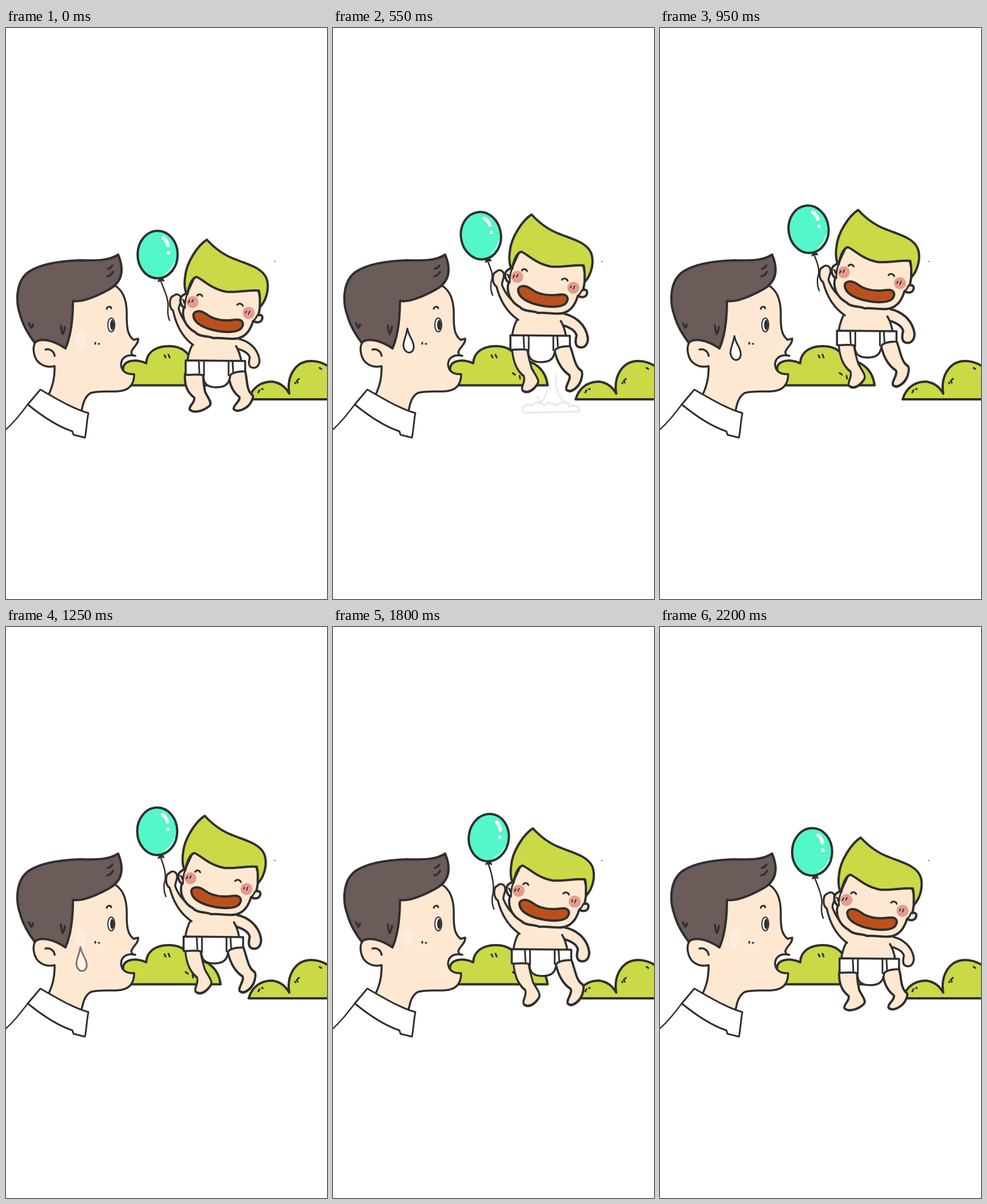
Write an HTML page that moves like this. It is 561x998 px and loops after 2250 ms.

```html
<!DOCTYPE html>
<html>
<head>
<meta charset="utf-8">
<style>
html, body { margin: 0; width: 100%; height: 100%; overflow: hidden; background: #fff; }
svg { display: block; width: 100%; height: 100%; }
svg * { stroke-linecap: round; stroke-linejoin: round; }
.thin { stroke-width: 2.5; }
.mid { stroke-width: 3.5; }
.skin { fill: #fee8d2; }
.green { fill: #cad945; }
.white { fill: #fff; }
.brown { fill: #6b5b59; }
.dark { fill: #2f2f2f; }
.blush { fill: #e49c8c; stroke: none; }
</style>
</head>
<body>
<svg viewBox="0 0 561 998" stroke="#2f2f2f" stroke-width="4" fill="none">
  <!-- bushes -->
  <path class="green" d="M206 602C198 582 226 576 245 586C246 565 264 556 285 556C307 556 320 568 323 581C352 579 372 598 375 624.5H215Z"/>
  <path class="green" d="M424 649C431 626 448 618 465 618C481 620 490 630 495 639C490 610 505 582 533 582C548 582 558 587 567 594V649Z"/>
  <path stroke-width="3" d="M277 572l2 4M284 571l2 5M314 603l4 3M326 608l1 5M443 633l-2 4M449 631h-2M505 620l1 1M512 613l-4 4l2 3M548 594l3 2"/>
  <circle class="dark" cx="470" cy="408" r="1" stroke="none"/>

  <!-- man -->
  <path class="skin mid" d="M188 449C206 458 212 480 211 505C211 528 214 538 223 545L231 543C232 553 220 559 219 567Q220 573 226 573C214 570 202 574 201 588C202 600 210 606 224 605C224 622 216 634 195 635C178 636 160 634 148 638C139 643 135 654 133 665L130 675L78 650L74 642C82 625 85 612 85 591Q72 594 62 588C47 580 44 554 54 546L110 480Z"/>
  <path class="mid" d="M69 562C78 560 84 566 85 573"/>
  <path class="brown" d="M196 396C182 406 160 407 130 406C95 407 60 413 40 426C16 443 17 480 25 502C30 522 41 538 50 550C60 541 82 545 104 560C115 535 117 505 117 477C135 480 160 468 180 457C207 442 205 418 196 396Z"/>
  <path class="mid" d="M186 415Q183 420 178 421M187 426Q184 433 177 434M96 520Q97 530 99 535Q103 528 103 522M40 516l4 8q3-2 3-6"/>
  <path stroke-width="3" d="M176 491C177 486 183 486 184 490M156 550v2M162 552h1"/>
  <ellipse class="white" cx="184" cy="519" rx="6" ry="12" stroke-width="2"/>
  <ellipse class="dark" cx="185.5" cy="519" rx="3.5" ry="9" stroke="none"/>
  <ellipse cx="131" cy="545" rx="8.5" ry="16" fill="#feeedf" stroke="none"/>
  <path class="white" stroke-width="3" d="M60 632L38 658C65 680 92 697 116 705L118 711L138 716C141 700 141 688 144 673C118 666 92 650 60 632Z"/>
  <path class="thin" d="M38 658C25 675 12 692 -4 705"/>
  <path id="drop" class="white" stroke-width="3" d="M-2-21C-4-8-9 0-9 9C-8 17-3 21 1 21C6 21 10 16 9 9C8-2 0-8-2-21Z"/>

  <!-- puff of dust -->
  <g id="puff" class="white" stroke-width="3">
    <path stroke="none" d="M374 612C377 640 370 652 360 660H412C390 650 388 630 389 606Z"/>
    <path d="M335 672C330 662 340 656 350 660C355 652 365 654 369 660C376 653 386 656 390 661C396 653 411 653 410 662C420 658 430 662 427 670Z"/>
    <path class="thin" fill="none" d="M374 612C378 640 370 652 360 656M389 610C388 640 396 654 412 657M358 645l6 9M376 624l4 8"/>
  </g>

  <g id="baby">
    <path id="leftLeg" class="skin" d="M313 604C311 625 318 638 329 646C331 655 319 660 321 667C330 675 347 668 356 660C361 655 352 645 348 636C346 625 344 618 345 604"/>
    <path id="rightLeg" class="skin" d="M389 604C390 622 396 636 408 645C410 652 396 660 398 666C404 673 420 666 427 656C431 649 434 643 429 640C420 632 422 615 418 600"/>
    <path id="rightArm" class="skin" stroke-width="3.5" d="M404 543C424 546 440 560 443 580C443 590 438 594 433 594C425 594 423 588 426 576C424 568 414 563 402 560"/>
    <path class="skin" stroke="none" d="M331 530L326 553Q319 566 317 582H411Q409 565 402 557L410 536Z"/>
    <path class="mid" d="M326 553Q319 566 317 582M402 556Q409 568 411 582"/>
    <path id="string" class="thin"/>
    <g id="balloon">
      <path class="dark" d="M4 41l-3 6l5-2l5 1l-3-6z" stroke-width="2"/>
      <ellipse rx="35" ry="41.5" fill="#53f7c9"/>
      <path stroke="#fff" stroke-width="6" d="M10-29Q17-24 18-16"/>
      <circle class="white" cx="19" cy="-3" r="3" stroke="none"/>
      <path stroke="#fff" stroke-width="1.5" d="M13 34Q25 27 30 13"/>
    </g>
    <path id="leftArm" class="skin mid" d="M327 554C308 540 297 518 292 494C284 488 285 470 293 468C298 463 305 466 306 473C307 480 301 486 302 492C308 510 318 523 338 533"/>
    <path class="white mid" d="M314 581L418 582V600C408 600 396 602 392 607C390 625 380 628 367 628C350 628 345 620 345 607C335 604 322 607 314 606Z"/>
    <path stroke-width="3" d="M337 582l1 21M346 582v26M389 583v24M396 583l1 18"/>
    <path class="skin" d="M317 462C312 466 303 467 305 480Q308 488 311 488C306 505 313 522 331 532C337 540 355 538 362 542C375 540 395 546 407 542C420 538 427 528 432 512Q440 517 446 512C450 506 448 500 441 502Q445 488 444 470L440 455L331 432Z"/>
    <path stroke-width="3" d="M317 464Q312 477 313 489M309 475q3 2 2 5M439 502Q437 508 432 512"/>
    <path class="green" d="M351 370C335 380 315 410 313 435C311 450 313 462 317 465C320 450 325 437 333 435C345 440 360 457 385 461C405 463 425 457 442 459C445 470 443 480 444 488C458 472 460 450 455 437C447 419 425 414 400 404C378 396 362 382 351 370Z"/>
    <circle class="blush" cx="326" cy="479" r="10.5"/>
    <circle class="blush" cx="424" cy="498" r="10.5"/>
    <path stroke-width="2" d="M321 476l-2 4M327 475l-2 4M420 495l-1 3M426 495l-2 5"/>
    <path stroke-width="3" d="M334 468C336 464 342 465 343 469M404 484C407 480 413 482 414 486"/>
    <path fill="#bc501d" d="M328 505C325 494 338 492 350 500C365 512 385 512 400 510C415 508 417 518 410 526C400 534 375 532 355 526C340 521 330 515 328 505Z"/>
  </g>
</svg>
<script>
const LOOP = 2250, STEP = 50;
const { min, max, sin, cos, PI } = Math;
const set = (id, name, value) => document.getElementById(id).setAttribute(name, value);
const place = (id, value) => set(id, 'transform', value);
const pivot = (id, x, y, action) => place(id, `translate(${x} ${y}) ${action} translate(${-x} ${-y})`);
const fade = (id, value) => set(id, 'opacity', max(0, min(1, value)));

function draw(t) {
  const left = LOOP - t;
  const lift = max(0, min(.088 * (t - 50), 52, .04 * left)); // fast jump, hover, slow fall
  const air = min(1, t / 300, left / 400);                   // 0 standing, 1 limbs stretched
  const swing = max(min(t / 230, 1, (1300 - t) / 500), -left / 500);

  place('baby', `translate(${-.09 * lift} ${-lift})`);
  pivot('leftLeg', 327, 596, `rotate(${-9 * air}) scale(${1 - .18 * air} ${1 + .15 * air})`);
  pivot('rightLeg', 402, 598, `rotate(${-10 * air}) scale(${1 - .04 * air} ${1 + .16 * air})`);
  pivot('rightArm', 405, 545, `scale(${1 + .17 * air})`);
  pivot('leftArm', 330, 540, `rotate(${-3 * air})`);

  // The balloon drags behind the jump, then leads the fall
  const x = 265 - 6 * swing + 3.5 * air, y = 396 + 11 * swing, tilt = -8.5 * swing;
  place('balloon', `translate(${x} ${y}) rotate(${tilt})`);
  const a = tilt * PI / 180;
  const knotX = x + 5 * cos(a) - 45 * sin(a), knotY = y + 5 * sin(a) + 45 * cos(a);
  const endX = 286 - 3 * air;
  set('string', 'd', `M${knotX} ${knotY}C${knotX + 7} ${knotY + 18} 285 475 ${endX - 3} 489Q${endX - 4} 503 ${endX} 511`);

  place('drop', `translate(132 ${535 + .02 * t + 126 * (t / 1800) ** 5}) scale(${min(1, .4 + t / 600)})`);
  fade('drop', min(t / 150, (1640 - t) / 640));

  pivot('puff', 380, 664, `scale(${.95 + t / 5000})`);
  fade('puff', min(t / 100, (580 - t) / 300));
}

function tick() {
  draw(Math.floor(performance.now() % LOOP / STEP) * STEP);
  requestAnimationFrame(tick);
}
tick();
</script>
</body>
</html>
```
